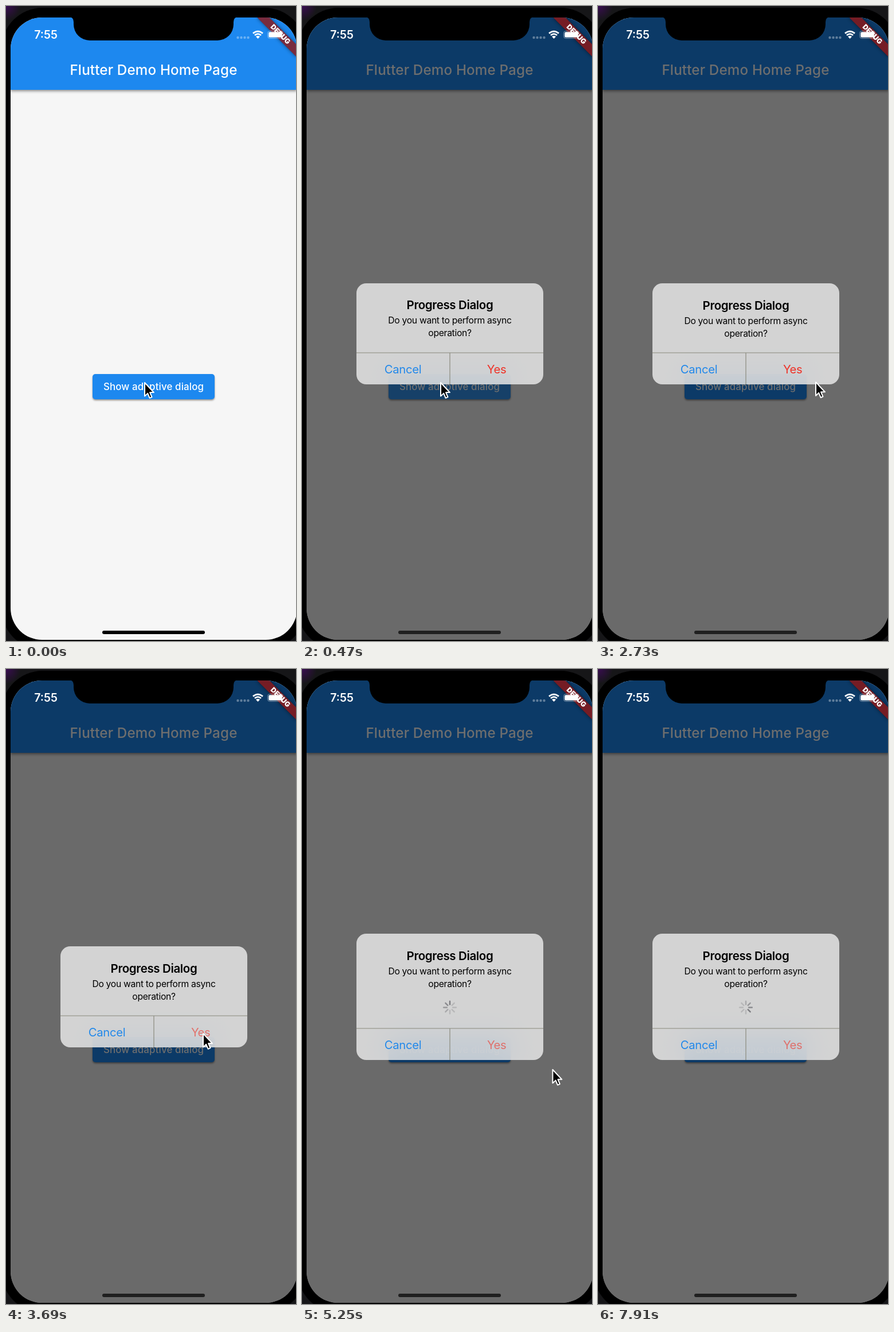
An HTML page for the animation above (8000 ms loop, 506 px wide and 1106 px high).

```html
<!DOCTYPE html>
<html lang="en">
<head>
<meta charset="utf-8">
<title>Adaptive dialog</title>
<style>
html, body { margin: 0; width: 100%; height: 100%; overflow: hidden; background: #161618; }
div, svg { position: absolute; }
svg { left: 0; top: 0; overflow: visible; }
text { font-family: Inter, Roboto, sans-serif; text-anchor: middle; }
#stage { width: 506px; height: 1106px; overflow: hidden;
  background: radial-gradient(circle at 0 0, #3a0d52, #161618 26px); }
#bezel { left: -8px; top: 3px; width: 531px; height: 1118px; border-radius: 72px; background: #000; }
#screen { left: 7.5px; top: 20px; width: 500px; height: 1084px; border-radius: 55px;
  overflow: hidden; background: #f6f6f6; }
#header { width: 500px; height: 126px; background: #1d88ef; box-shadow: 0 2px 5px #0007; }
#button { left: 143.5px; top: 621px; width: 213px; height: 44px; border-radius: 5px;
  background: #1d88ef; box-shadow: 0 2px 3px #0006; overflow: hidden; }
#splash { inset: 0; background: #fff; }
#barrier { inset: 0; background: #000; }
#banner { left: 422.5px; top: 21.8px; width: 97px; height: 14.5px; transform: rotate(45deg);
  background: linear-gradient(#b71c1ca0, #b71c1ca0), #0000007f; box-shadow: 0 0 6px #0000007f; }
#dialog { left: 87px; width: 326px; border-radius: 17px; overflow: hidden;
  background: #eeeeeecc; backdrop-filter: blur(24px); }
</style>
</head>
<body>
<div id="stage">
  <div id="bezel"></div>
  <div id="screen">
    <div id="header"></div>
    <div id="button"><div id="splash"></div></div>
    <svg width="500" height="1084" fill="#fff" font-weight="500">
      <text x="249.5" y="100" font-size="24.2" letter-spacing=".17">Flutter Demo Home Page</text>
      <text x="249.5" y="649" font-size="16.9" letter-spacing=".13">Show adaptive dialog</text>
    </svg>
    <div id="barrier"></div>
    <div id="banner"></div>
    <svg width="500" height="100">
      <text transform="translate(471 29) rotate(45)" y="4.4" font-size="12.3" font-weight="900" fill="#fff">DEBUG</text>
    </svg>
    <div id="dialog">
      <svg width="326" height="220">
        <text x="163" y="45.5" font-size="20.5" font-weight="600" letter-spacing="-.36">Progress Dialog</text>
        <g font-size="15.7" letter-spacing="-.32">
          <text x="163" y="70.5">Do you want to perform async</text>
          <text x="163" y="92.5">operation?</text>
        </g>
        <g id="spinner" transform="translate(163 128.5)"></g>
        <g id="actions" font-size="20.3">
          <path d="M0-55H326M163-55V0" stroke="#8a8a7d" stroke-width="1.2"/>
          <text x="81" y="-19.5" fill="#2389ea" letter-spacing="-.3">Cancel</text>
          <text id="yes" x="244.5" y="-19.5" fill="#ee3328" letter-spacing="-.5">Yes</text>
        </g>
      </svg>
    </div>
  </div>
  <svg width="506" height="1106">
    <path d="M111 19Q118 20 118 28V32A28 28 0 0 0 146 60H369A28 28 0 0 0 397 32V28Q397 20 404 19Z"/>
    <g fill="#fff">
      <text x="69.5" y="57" font-size="19.5" font-weight="600">7:55</text>
      <g opacity=".35">
        <circle cx="404.5" cy="55" r="2.2"/><circle cx="410.5" cy="55" r="2.2"/>
        <circle cx="416.5" cy="55" r="2.2"/><circle cx="422.5" cy="55" r="2.2"/>
      </g>
      <path d="M439.5 57L436 53.3Q439.5 50.6 443 53.3Z"/>
      <path d="M434 51Q439.5 46.3 445 51M431 47.6Q439.5 40.6 448 47.6" fill="none" stroke="#fff" stroke-width="2.8"/>
      <rect x="456.5" y="43.5" width="27" height="13" rx="4" fill="none" stroke="#fff" stroke-opacity=".45"/>
      <rect x="458.2" y="45.2" width="23.6" height="9.6" rx="2.5"/>
      <path d="M485.5 47.5Q488.5 50 485.5 52.5Z" opacity=".5"/>
    </g>
    <rect id="home" x="168" y="1088" width="179" height="6" rx="3"/>
    <path id="cursor" d="M0 0V23.6L5.2 18.6L8.7 26.8L12.5 25.1L9.1 17.1H16Z"
      stroke="#fff" stroke-width="2" stroke-linejoin="round"/>
  </svg>
</div>
<script>
const $ = id => document.getElementById(id);
const clamp = v => Math.min(1, Math.max(0, v));
const span = (t, from, to) => clamp((t - from) / (to - from));
const smooth = v => v * v * (3 - 2 * v);
const mix = (a, b, p) => a + (b - a) * p;

const LOOP = 8000, TICKS = 8;
// time, x, y of the pointer tip
const pointer = [[0, 242, 656], [1000, 242, 656], [1600, 385, 658], [2600, 385, 658],
  [3200, 344, 635], [4900, 344, 635], [5600, 530, 760], [LOOP, 530, 760]];

const ticks = Array.from({ length: TICKS }, (_, i) => {
  const tick = document.createElementNS("http://www.w3.org/2000/svg", "rect");
  const attrs = { x: -1.2, y: -12, width: 2.4, height: 8, rx: 1.2, fill: "#3c3c43", transform: `rotate(${i * 45})` };
  for (const name in attrs) tick.setAttribute(name, attrs[name]);
  return $("spinner").appendChild(tick);
});

function drawPointer(t) {
  const i = pointer.findIndex(key => key[0] > t);
  const [t0, x0, y0] = pointer[i - 1], [t1, x1, y1] = pointer[i];
  const p = smooth(span(t, t0, t1));
  $("cursor").setAttribute("transform", `translate(${mix(x0, x1, p)} ${mix(y0, y1, p)})`);
}

function drawSpinner(t) {
  $("spinner").setAttribute("opacity", span(t, 3800, 3950));
  const head = Math.floor(1.1 + 7.2 * (t - 4270) / 1000);
  ticks.forEach((tick, i) => {
    const age = (((head - i) % TICKS) + TICKS) % TICKS;
    tick.setAttribute("opacity", Math.max(47, 147 - 25 * age) / 255);
  });
}

function drawDialog(t) {
  const shown = smooth(span(t, 110, 360));
  const scale = 1 + .3 * (1 - span(t, 110, 360)) ** 3;
  const height = mix(176, 220, smooth(span(t, 3720, 3940)));
  const style = $("dialog").style;
  style.opacity = shown;
  style.transform = `scale(${scale})`;
  style.height = height + "px";
  style.top = 550.5 - height / 2 + "px";
  $("actions").setAttribute("transform", `translate(0 ${height})`);
  $("yes").setAttribute("opacity", t < 3600 ? 1 : .6);
  $("barrier").style.opacity = .57 * shown;
  $("home").setAttribute("fill", `rgb(${Array(3).fill(32 * shown)})`);
}

function frame(now) {
  const t = now % LOOP;
  $("splash").style.opacity = .1 * span(t, 40, 200) * (1 - span(t, 470, 800));
  drawDialog(t);
  drawSpinner(t);
  drawPointer(t);
  requestAnimationFrame(frame);
}
frame(0);
</script>
</body>
</html>
```
